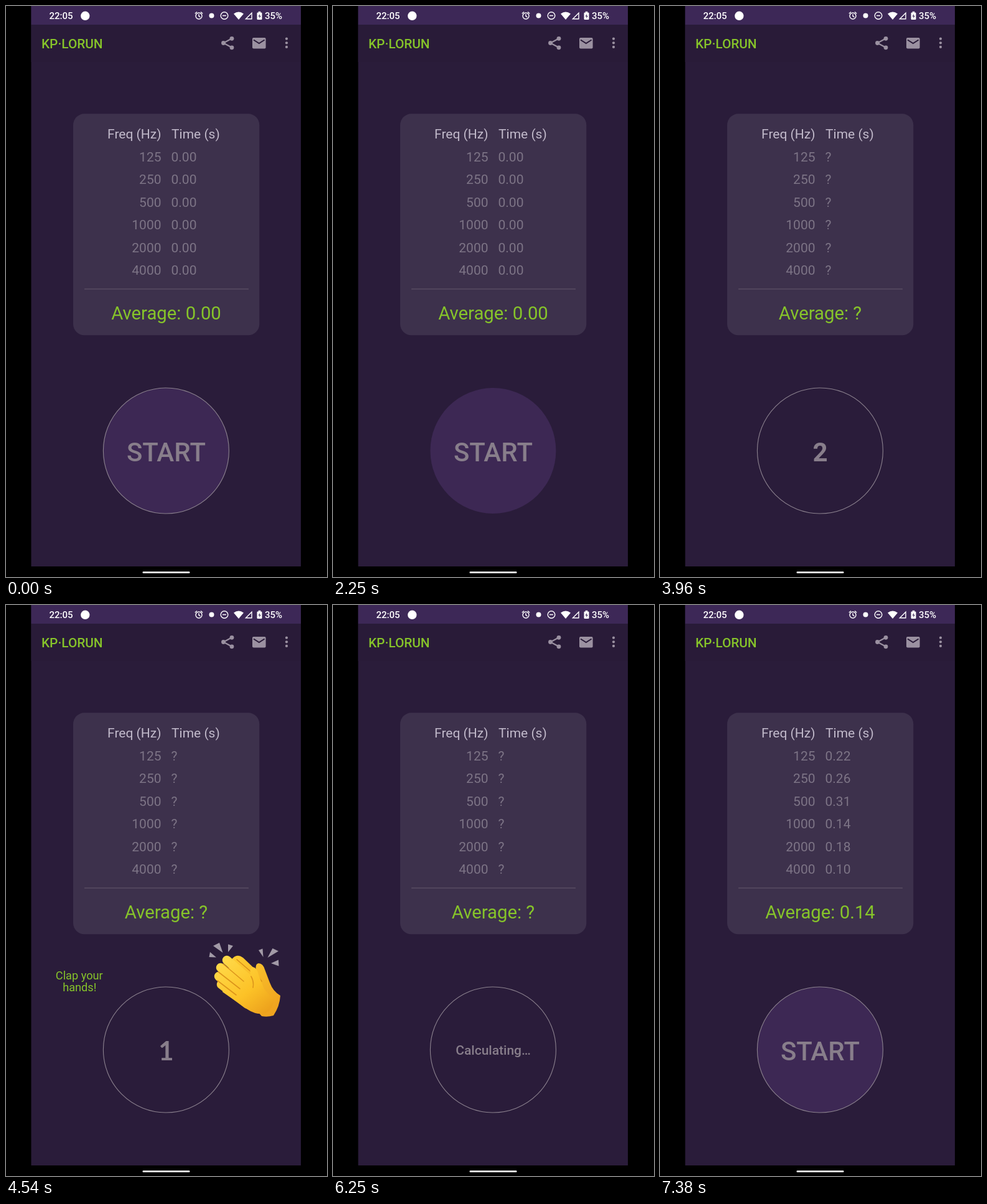
Write an HTML page that moves like this. It is 516 px wide and 918 px high and loops after 7970 ms.

```html
<!DOCTYPE html>
<html lang="en">
<head>
<meta charset="utf-8">
<title>Reverberation timer</title>
<style>
  html, body { margin: 0; width: 100%; height: 100%; overflow: hidden; background: #000; }
  svg { display: block; width: 100%; height: 100%; }
  text { font-family: Roboto, "Noto Sans", sans-serif; }
  .medium { font-weight: 500; }
  .mid { text-anchor: middle; }
  .end { text-anchor: end; }
  .green { fill: #86c42a; }
  .row { font-size: 21px; fill: #7d7486; }
  .head { font-size: 21px; fill: #c2bacb; }
</style>
</head>
<body>
<svg viewBox="0 0 516 918">
  <defs>
    <linearGradient id="skin" gradientUnits="userSpaceOnUse" x1="350" y1="565" x2="430" y2="660">
      <stop offset="0" stop-color="#ffda4a"/>
      <stop offset=".55" stop-color="#fcc227"/>
      <stop offset="1" stop-color="#e9991a"/>
    </linearGradient>
    <linearGradient id="skinBack" gradientUnits="userSpaceOnUse" x1="375" y1="565" x2="438" y2="640">
      <stop offset="0" stop-color="#fdcb31"/>
      <stop offset="1" stop-color="#efa41f"/>
    </linearGradient>
  </defs>

  <rect width="516" height="918" fill="#000"/>
  <rect x="40.5" width="433.5" height="901" fill="#2a1c3a"/>
  <rect x="40.5" y="30" width="433.5" height="60" fill="#291b38"/>
  <rect x="40.5" width="433.5" height="30" fill="#3d2857"/>
  <rect x="219.5" y="909.3" width="76" height="2.8" rx="1.4" fill="#fff"/>

  <!-- status bar -->
  <g fill="#fff">
    <text class="medium" x="69.5" y="21" font-size="15">22:05</text>
    <text class="medium" x="416" y="21" font-size="15">35%</text>
    <circle cx="127.3" cy="15.8" r="7.2"/>
    <circle cx="330.5" cy="15.5" r="4"/>
    <path d="M366 12.5Q374 6.500 382 12.500L374 22Z"/>
    <rect x="403.500" y="10.500" width="8" height="11.500" rx="1.200"/>
    <rect x="405.700" y="8.800" width="3.600" height="2"/>
  </g>
  <path d="M408.300 12.500l-2.800 4.200h2.200l-.7 3.500 2.800-4.500h-2.200z" fill="#3d2857"/>
  <g fill="none" stroke="#fff" stroke-width="1.400">
    <circle cx="310" cy="16" r="5"/>
    <path d="M310 13v3.300l2.400 1.500M303.800 12.200l3.200-2.700M316.200 12.200l-3.200-2.700"/>
    <circle cx="351" cy="15.500" r="5.800"/>
    <path d="M348 15.500h6M385.500 20.800L395 11.300V20.800Z"/>
  </g>

  <!-- toolbar -->
  <text class="medium green" x="57" y="67.500" font-size="20.800">KP·LORUN</text>
  <g fill="#9b91a1">
    <path d="M363 52.300L349.500 59.500L363 66.800" fill="none" stroke="#9b91a1" stroke-width="2.200"/>
    <circle cx="363" cy="52.300" r="3.400"/>
    <circle cx="349.500" cy="59.500" r="3.400"/>
    <circle cx="363" cy="66.800" r="3.400"/>
    <rect x="396" y="51" width="21.600" height="17.500" rx="2"/>
    <path d="M398 54.500l8.800 5.600 8.800-5.600" fill="none" stroke="#291b38" stroke-width="2"/>
    <circle cx="451" cy="52.700" r="2.100"/>
    <circle cx="451" cy="59.300" r="2.100"/>
    <circle cx="451" cy="65.900" r="2.100"/>
  </g>

  <!-- results card -->
  <rect x="108" y="173.300" width="299.300" height="356" rx="18" fill="#3d314c"/>
  <text class="head end" x="249.500" y="213">Freq (Hz)</text>
  <text class="head" x="266" y="213">Time (s)</text>
  <g id="rows"></g>
  <path d="M126 455H390" stroke="#584d62" stroke-width="1.500"/>
  <text id="average" class="mid green" x="257.500" y="504.300" font-size="29.300"></text>

  <!-- button -->
  <circle id="button" cx="257.400" cy="715" r="101" stroke-width="1.100"/>
  <text id="label" class="medium mid" x="257.500" fill="#887e8b"></text>

  <!-- clap hint -->
  <g id="hint">
    <text class="mid green" font-size="18.200">
      <tspan x="117.800" y="602">Clap your</tspan><tspan x="118.300" y="621">hands!</tspan>
    </text>
    <path fill="#a29aa7" d="M333 548L343 543L348.500 559ZM357 545.500L365 548L357 558ZM328 558L338 566.500L326.500 566ZM406 555L412.500 552.500L413.500 566ZM428.500 552L438 556.500L420.500 567ZM426 576L438 570.500L438.500 580.500Z"/>
    <path fill="url(#skinBack)" d="M362 571Q370 559 381 567L402 587Q400 577 406 576Q413 576 416 586L424 607Q429 621 441 628Q440 645 430 660Q420 663 411 661L375 620Z"/>
    <path fill="none" stroke="#d88d18" stroke-width="1.500" stroke-linecap="round" d="M371 570L399 594M402 587Q405 598 411 605"/>
    <g id="fingers" stroke="url(#skin)" stroke-width="14.500" stroke-linecap="round"></g>
    <path fill="url(#skin)" d="M362 570L393 597Q391 584 396 582Q403 582 406 594L412 610Q416 623 431 633Q429 650 417 657Q401 659 388 650L348 622Z"/>
    <path fill="none" stroke="#dc941b" stroke-width="1.600" stroke-linecap="round" d="M349 577L382 605M341.500 590L376 617M340 604L370 627M394 597Q399 606 397 615"/>
  </g>
</svg>
<script>
  const LOOP = 7970;
  const SVG = "http://www.w3.org/2000/svg";
  const $ = id => document.getElementById(id);

  function add(parent, tag, attrs, text = "") {
    const el = document.createElementNS(SVG, tag);
    for (const key in attrs) el.setAttribute(key, attrs[key]);
    el.textContent = text;
    parent.append(el);
    return el;
  }

  const cells = [125, 250, 500, 1000, 2000, 4000].map((freq, i) => {
    const y = 249.5 + i * 36.56;
    add($("rows"), "text", { class: "row end", x: 249.5, y }, freq);
    return add($("rows"), "text", { class: "row", x: 265.5, y });
  });

  const fingers = [[355, 571, 395, 606], [345, 583, 388, 618],
                   [342, 597, 386, 632], [346, 610, 388, 642]];
  for (const [x1, y1, x2, y2] of fingers) add($("fingers"), "line", { x1, y1, x2, y2 });

  const zero = Array(7).fill("0.00");
  const unknown = Array(7).fill("?");
  const measured = ["0.22", "0.26", "0.31", "0.14", "0.18", "0.10", "0.14"];

  const steps = [
    { at: 0, label: "START", values: zero, filled: true },
    { at: 2250, label: "START", values: zero, filled: true, pressed: true },
    { at: 3420, label: "3", values: unknown },
    { at: 3960, label: "2", values: unknown },
    { at: 4540, label: "1", values: unknown, hint: true },
    { at: 5130, label: "Measuring…", values: unknown, hint: true },
    { at: 5670, label: "Calculating…", values: unknown },
    { at: 6790, label: "START", values: measured, filled: true }
  ];

  let shown;
  function show(step) {
    if (step === shown) return;
    shown = step;
    cells.forEach((cell, i) => cell.textContent = step.values[i]);
    $("average").textContent = "Average: " + step.values[6];
    $("button").setAttribute("fill", step.filled ? "#3d2854" : "none");
    $("button").setAttribute("stroke", step.pressed ? "none" : "#8b818e");
    $("hint").style.display = step.hint ? "" : "none";

    const small = step.label.length > 5;
    const label = $("label");
    label.textContent = step.label;
    label.setAttribute("y", small ? 723 : 731.7);
    label.style.fontSize = small ? "21px" : "42px";
    // The final digit has a footed "1".
    label.style.fontFamily = step.label === "1" ? "Lato, sans-serif" : "";
    label.style.fontWeight = step.label.length === 1 ? 700 : 500;
  }

  const start = performance.now();
  function draw() {
    const t = (performance.now() - start) % LOOP;
    show(steps.findLast(step => step.at <= t));
    requestAnimationFrame(draw);
  }
  draw();
</script>
</body>
</html>
```
